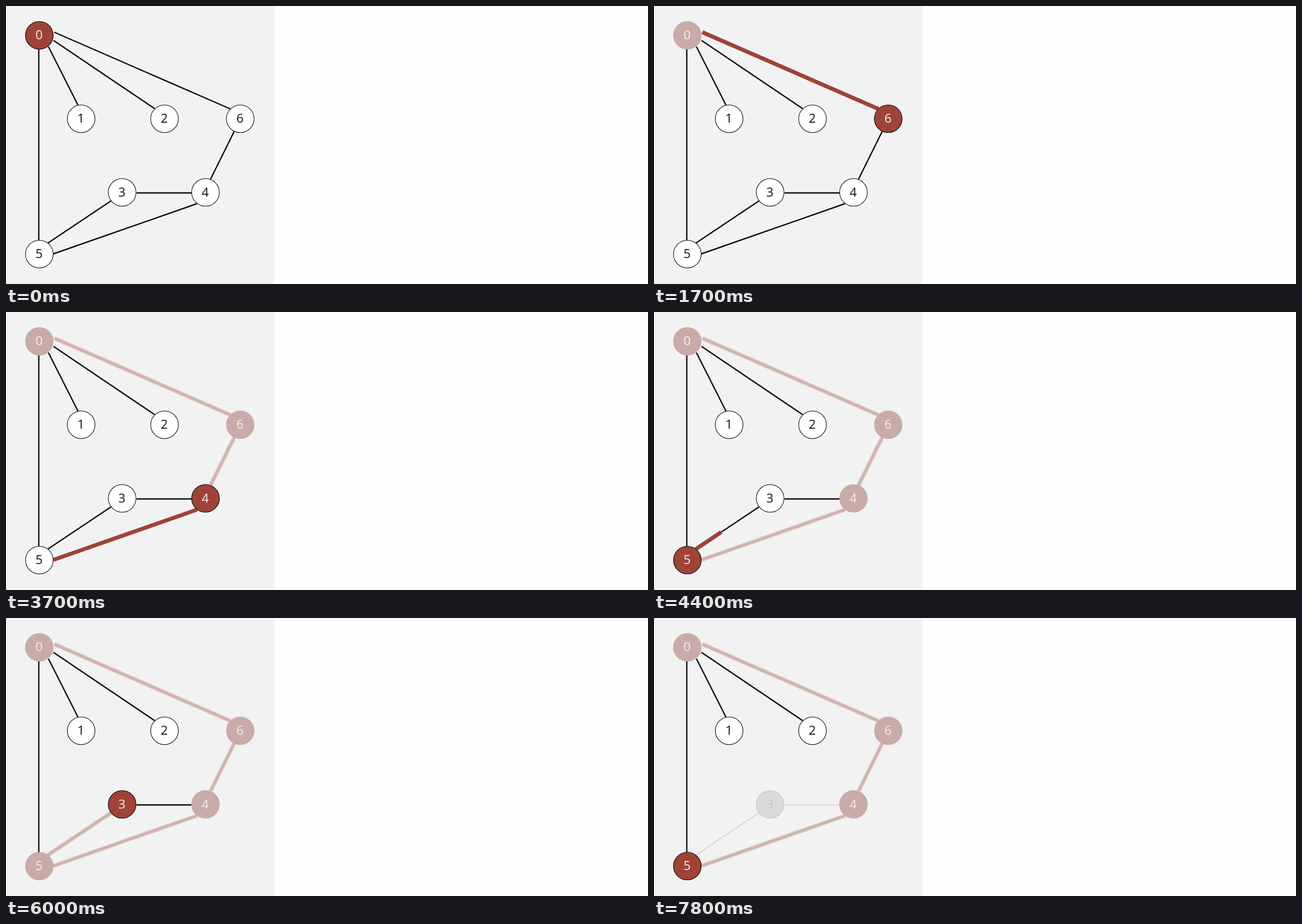
Recreate the animation shown at these times as an HTML page. Size 1136 px wide and 493 px high, loop 8 s.

```html
<!DOCTYPE html>
<html lang="en">
<head>
<meta charset="utf-8">
<title>Depth-first search</title>
<style>
  html, body { margin: 0; width: 100%; height: 100%; overflow: hidden; background: #fefefe; }
  svg { display: block; width: 100%; height: 100%; }
  text { font: 22px "Open Sans", "Noto Sans", sans-serif; text-anchor: middle; }
</style>
</head>
<body>
<svg id="stage" viewBox="0 0 1136 493">
  <rect width="475" height="493" fill="#f2f2f2"/>
</svg>
<script>
const LOOP = 8000, STEP = 100;
const RED = '#9f4337', INK = '#111';

// x, y, time of first visit, time of completion
const nodes = [
  [59, 52, 0], [133, 200], [280.5, 200], [205.5, 330.5, 5000, 7400],
  [353, 330.5, 3000], [59, 440, 4000], [414.5, 200, 900]
].map(([x, y, seen = Infinity, done = Infinity]) => ({ x, y, seen, done }));

// end points, time of traversal, time of completion
const edges = {
  '0-5': [58, 77, 58, 416],
  '0-1': [75, 72, 127.5, 176],
  '0-2': [84, 61, 263, 182],
  '0-6': [85.5, 46.5, 397, 182.5, 900],
  '6-4': [404, 222, 362, 307, 3000],
  '3-4': [231, 331.5, 328, 331.5, Infinity, 7100],
  '3-5': [186, 345.5, 74, 420.5, 5000, 7100],
  '4-5': [338, 350.5, 84, 439.5, 4000]
};

// edge, start, end, steps, drawn from its second point
const wipes = [
  ['0-6', 200, 900, 5, false],
  ['0-6', 1200, 1900, 6, true],
  ['6-4', 2200, 3000, 5, false],
  ['4-5', 3300, 4000, 5, false],
  ['3-5', 4300, 5000, 5, true],
  ['3-5', 5300, 6000, 5, false],
  ['3-4', 6400, 7100, 5, false]
];

// time from which each node is the current one
const visits = [[0, 0], [900, 6], [3000, 4], [4000, 5], [5000, 3]];
const BACKTRACK = 7400;

const stage = document.getElementById('stage');

function set(el, attrs) {
  for (const key in attrs) el.setAttribute(key, attrs[key]);
  return el;
}

function add(tag, attrs) {
  return stage.appendChild(set(document.createElementNS('http://www.w3.org/2000/svg', tag), attrs));
}

function addLine([x1, y1, x2, y2], width) {
  return add('line', { x1, y1, x2, y2, 'stroke-width': width });
}

const lerp = (a, b, p) => a + (b - a) * p;
const progress = (t, start, steps) =>
  t < start ? 0 : Math.min(1, (Math.floor((t - start) / STEP) + 1) / steps);

const edgeParts = Object.values(edges).map(pts => ({
  seen: pts[4] ?? Infinity,
  done: pts[5] ?? Infinity,
  band: addLine(pts, 7),
  core: addLine(pts, 2.4)
}));
const trail = add('line', { stroke: RED, 'stroke-width': 7 });

for (const n of nodes) n.disc = add('circle', { cx: n.x, cy: n.y, r: 24.5, 'stroke-width': 1.1 });
const marker = add('circle', { r: 24.5, fill: RED, stroke: INK, 'stroke-width': 1.2 });
nodes.forEach((n, i) => {
  n.label = add('text', { x: n.x - 0.5, y: n.y + 7 });
  n.label.textContent = i;
});

function drawEdges(t) {
  for (const e of edgeParts) {
    const done = t >= e.done, seen = t >= e.seen && !done;
    set(e.band, { stroke: seen ? '#dcc0bb' : 'none' });
    set(e.core, { stroke: done ? '#dadada' : seen ? '#cbaeaa' : INK });
  }
  const wipe = wipes.find(([, start, end]) => t >= start && t < end);
  set(trail, { visibility: wipe ? 'visible' : 'hidden' });
  if (!wipe) return;
  const [id, start, , steps, reverse] = wipe;
  let [x1, y1, x2, y2] = edges[id];
  if (reverse) [x1, y1, x2, y2] = [x2, y2, x1, y1];
  const p = progress(t, start, steps);
  set(trail, { x1, y1, x2: lerp(x1, x2, p), y2: lerp(y1, y2, p) });
}

function drawNodes(t) {
  const current = nodes[visits.filter(([time]) => t >= time).pop()[1]];
  const p = progress(t, BACKTRACK, 5);
  set(marker, { cx: lerp(current.x, nodes[5].x, p), cy: lerp(current.y, nodes[5].y, p) });

  for (const n of nodes) {
    const [fill, stroke, text] =
      t >= n.done ? ['#dadada', '#c8c8c8', '#c4c4c4'] :
      t >= n.seen ? ['#c9aba7', '#c2aaa7', '#f8efed'] :
      ['#fff', INK, INK];
    set(n.disc, { fill, stroke });
    set(n.label, { fill: text });
  }
}

function render(t) {
  drawEdges(t);
  drawNodes(t);
}

const begin = performance.now();
function tick() {
  render((performance.now() - begin) % LOOP);
  requestAnimationFrame(tick);
}
tick();
</script>
</body>
</html>
```
